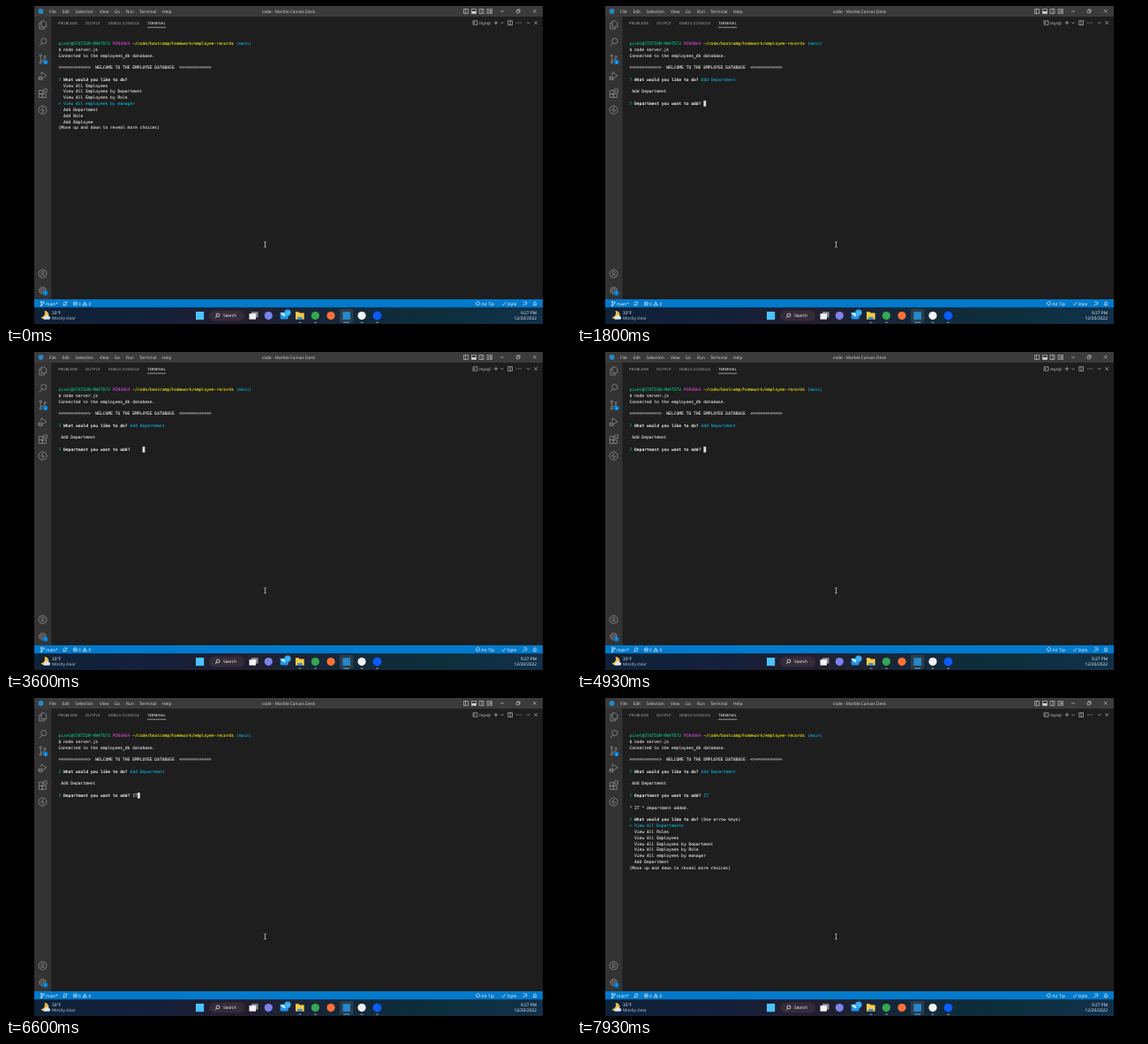
Animation, 640 px wide and 360 px high, one loop 8000 ms. Source, as an HTML page:

```html
<!DOCTYPE html>
<html lang="en">
<head>
<meta charset="utf-8">
<title>Employee records terminal</title>
<style>
  html, body { margin: 0; width: 100%; height: 100%; overflow: hidden; background: #000; }
  svg { display: block; width: 100vw; height: 100vh; }
  text { font-family: "Open Sans", sans-serif; font-size: 4.8px; fill: #d8d8d8; white-space: pre; text-rendering: geometricPrecision; }
  .term text { --ink: #dcdcdc; font-family: "DejaVu Sans Mono", monospace; font-size: 4.65px; fill: var(--ink); stroke: var(--ink); stroke-width: .1; }
  .term .bold { --ink: #f0f0f0; font-weight: 700; stroke: none; }
  .term .green { --ink: #0dbc79; }
  .term .magenta { --ink: #bc3fbc; }
  .term .yellow { --ink: #e5e510; }
  .term .cyan { --ink: #11a8cd; }
  .tabs text { font-size: 4.3px; fill: #aaa; }
  .tabs .on, .status text, .tray text { fill: #fff; }
  .line { fill: none; stroke: #8c8c8c; stroke-width: .8; }
  .chrome .line { stroke: #d0d0d0; stroke-width: .6; }
  .status .line { stroke: #fff; stroke-width: .6; }
  .tiny { font-size: 3.4px; fill: #fff; text-anchor: middle; }
  .end { text-anchor: end; }
</style>
</head>
<body>
<svg viewBox="0 0 640 360">
  <defs>
    <linearGradient id="taskbar">
      <stop offset="0" stop-color="#0e2238"/>
      <stop offset=".25" stop-color="#14203a"/>
      <stop offset=".4" stop-color="#241d2e"/>
      <stop offset=".6" stop-color="#14283a"/>
      <stop offset=".8" stop-color="#0c2f3c"/>
      <stop offset="1" stop-color="#12304a"/>
    </linearGradient>
  </defs>
  <rect width="640" height="360"/>
  <rect x="32" width="576" height="333" fill="#1e1e1e"/>
  <rect x="32" width="576" height="12" fill="#3b3b3b"/>
  <rect x="32" y="12" width="19.5" height="321" fill="#333"/>
  <rect x="32" y="341" width="576" height="19" fill="url(#taskbar)"/>
  <rect x="32" y="332" width="576" height="9.2" fill="#007acc"/>

  <g class="chrome">
    <circle cx="39.5" cy="6" r="2.9" fill="#2489ca"/>
    <g id="menu"></g>
    <text x="320" y="7.8" text-anchor="middle">code - Marble Canvas Desk</text>
    <path class="line" d="M518.5 3.5h5v5h-5zM520.5 3.5v5M527.5 3.5h5v5h-5zM536 3.5h5v5h-5zM539 3.5v5M545 3.5h2v5h-2zM548.5 3.5h2v2h-2zM548.5 6.5h2v2h-2z
      M560 6h4M578.2 4.8h3v3h-3zM579.2 4.8v-.9h2.9v2.9h-.9M597 4l3.6 3.6M600.6 4l-3.6 3.6"/>
    <path d="M527.5 6h5v2.5h-5z" fill="#d0d0d0"/>
    <path class="line" d="M529 16.8h5v4.4h-5zM530 18l1.2 1-1.2 1M552.7 19h4.6M555 16.7v4.6M560.5 18.3l1.5 1.5 1.5-1.5
      M568.7 16.7h4.8v4.8h-4.8zM571.1 16.7v4.8M590 18.2l1.7 1.7 1.7-1.7M598.4 17.2l3.6 3.6M602 17.2l-3.6 3.6"/>
    <path class="line" d="M578.4 19h5.5" stroke-dasharray=".8 1.4" style="stroke-width:.9"/>
    <text x="536" y="20.6" style="font-size:4.6px">mysql</text>
  </g>

  <g class="tabs">
    <text x="59" y="20.6">PROBLEMS</text>
    <text x="90" y="20.6">OUTPUT</text>
    <text x="116" y="20.6">DEBUG CONSOLE</text>
    <text x="160" y="20.6" class="on">TERMINAL</text>
    <path d="M160 24.2h21.3" stroke="#e7e7e7" stroke-width=".6"/>
  </g>

  <!-- activity bar -->
  <path class="line" d="M40 17h3.5l2.2 2.2v4.6H40zM40 19h-2.2v7h5.6v-2.2
    M41 41.8l-3.4 3.6M39.3 56.5v7M39.3 61.5q4.7 0 4.7-3
    M40 78v-3.2l6 4-4.5 3M37.3 80h3.6v3.5h-3.6zM36.5 81.8h5.2
    M37.3 95.5h4v4h-4zM37.3 99.5h4v4h-4zM41.3 99.5h4v4h-4zM42.7 94h3.6v3.6h-3.6z
    M42.4 114.2l-2.8 3.8h3.8l-2.8 3.2M38.3 306.4q3.2-4 6.4 0"/>
  <g class="line">
    <circle cx="42.8" cy="39.6" r="3.1"/>
    <circle cx="39.3" cy="56" r="1.2"/><circle cx="44" cy="57.5" r="1.2"/><circle cx="39.3" cy="64" r="1.2"/>
    <circle cx="41.5" cy="117.6" r="4.6"/>
    <circle cx="41.5" cy="303" r="4.6"/><circle cx="41.5" cy="301.8" r="1.6"/>
    <circle cx="41.5" cy="322" r="1.4"/><circle cx="41.5" cy="322" r="3.2"/>
    <circle cx="41.5" cy="322" r="4.2" stroke-dasharray="1.65"/>
  </g>
  <g fill="#007acc"><circle cx="44.7" cy="63.3" r="2.9"/><circle cx="44.7" cy="325" r="2.9"/></g>
  <text class="tiny" x="44.7" y="64.6">6</text>
  <text class="tiny" x="44.7" y="326.3">1</text>

  <g class="term" id="terminal"></g>
  <path d="M292.2 267h1l.3.4.3-.4h1M293.5 267.3v5.4M292.2 273h1l.3-.4.3.4h1" fill="none" stroke="#ddd" stroke-width=".7"/>

  <g class="status">
    <path class="line" d="M40 335.5v3.4M40 338q2.6 0 2.6-1.8M65 336.5a2.1 2.1 0 0 1 3.8-.6M68.9 337.3a2.1 2.1 0 0 1-3.8.6M68.9 334.7v1.5h-1.5M65 339.2v-1.5h1.5
      M77.4 335.9l2 2M79.4 335.9l-2 2M89.2 334.8l2.2 4.1h-4.4zM89.2 336.2v1.4
      M534.6 337v2.5M533.2 338.6a2.2 2.2 0 1 1 2.8 0M562 337.2l1.4 1.5 2.8-3.6
      M585.8 339.3l1.2-2M586 335h3.8v2.6h-2.2M597 338.2q.8-.7.8-2 0-1.4 1.2-1.4t1.2 1.4q0 1.3.8 2zM598.5 339.2h1"/>
    <g class="line"><circle cx="40" cy="335" r=".8"/><circle cx="42.6" cy="335.5" r=".8"/><circle cx="40" cy="339.3" r=".7"/><circle cx="78.4" cy="336.9" r="2.1"/></g>
    <text x="45" y="338.5">main*</text>
    <text x="82" y="338.5">0</text>
    <text x="93.5" y="338.5">0</text>
    <text x="538.6" y="338.5">Air Tip</text>
    <text x="567.5" y="338.5">Style</text>
  </g>

  <g class="tray">
    <path d="M43.5 345a4.8 4.8 0 1 1-3.8 7.4a5 5 0 0 0 3.8-7.4z" fill="#f5b942"/>
    <path d="M43.6 354.8a1.8 1.8 0 0 1 .6-3.4 2.2 2.2 0 0 1 4-.2 1.8 1.8 0 0 1 .4 3.6z" fill="#d8e6f4"/>
    <text x="52" y="349.2">33°F</text>
    <text x="52" y="355.2" style="fill:#c8ccd2">Mostly clear</text>
    <rect x="215" y="346" width="9.2" height="9.2" fill="#4cc2ff"/>
    <rect x="230" y="344.8" width="40" height="11.8" rx="5.9" fill="#352c3a"/>
    <circle cx="240" cy="350" r="1.9" fill="none" stroke="#fff" stroke-width=".7"/>
    <path d="M238.6 351.4l-1.7 1.8" stroke="#fff" stroke-width=".7"/>
    <text x="246" y="352.4">Search</text>
    <rect x="278" y="346.2" width="7.5" height="6.5" fill="#8a9098"/>
    <rect x="275.5" y="348.2" width="7.5" height="6.5" fill="#f2f2f2"/>
    <circle cx="297.3" cy="350.6" r="4.6" fill="#7b83eb"/>
    <rect x="310.7" y="346.8" width="9" height="7.8" rx="1" fill="#2196e8"/>
    <path d="M310.7 348l4.5 3.4 4.5-3.4v-.6h-9z" fill="#d6edff"/>
    <circle cx="319" cy="347.2" r="3.7" fill="#2aa9f2"/>
    <text class="tiny" x="319" y="348.5">17</text>
    <path d="M328 346.2h3.5l1.2 1.3h5v7.3H328z" fill="#f7c948"/>
    <path d="M330.2 352.2h5.3v2.6h-5.3z" fill="#2788d8"/>
    <circle cx="350.4" cy="350.6" r="4.6" fill="#34a853"/>
    <circle cx="368" cy="350.6" r="4.6" fill="#ff7139"/>
    <rect x="378" y="343" width="15.4" height="15.4" rx="1.5" fill="#2c3c4c"/>
    <rect x="381.4" y="346.3" width="8.6" height="8.6" fill="#2489ca"/>
    <circle cx="403" cy="350.6" r="4.6" fill="#f2f2f2"/>
    <circle cx="420.5" cy="350.6" r="4.9" fill="#0b5cff"/>
    <path d="M331.5 358.2h3M349 358.2h3M401.5 358.2h3M419 358.2h3" stroke="#9aa1aa" stroke-width=".9"/>
    <path d="M382.2 358.2h7" stroke="#4cc2ff" stroke-width=".9"/>
    <text class="end" x="601" y="349.2">9:27 PM</text>
    <text class="end" x="601" y="355.2">12/20/2022</text>
  </g>
</svg>
<script>
const LOOP = 8000, LEFT = 59.4, CELL = 2.8, TOP = 44, ROW = 6.81;
const choices = [
  'View All Departments', 'View All Roles', 'View All Employees',
  'View All Employees by Department', 'View All Employees by Role',
  'View All employees by manager', 'Add Department', 'Add Role',
  'Add Employee', 'Delete Department'
];
const menuTitles = { File: 49, Edit: 63.5, Selection: 78.5, View: 106, Go: 122.5, Run: 136, Terminal: 151, Help: 177 };
document.getElementById('menu').innerHTML = Object.entries(menuTitles)
  .map(([title, x]) => `<text x="${x}" y="7.8">${title}</text>`).join('');

const escapeText = s => s.replace(/&/g, '&amp;').replace(/</g, '&lt;');
const put = (row, col, text, style = '') =>
  `<text class="${style}" x="${LEFT + col * CELL}" y="${TOP + row * ROW}">${escapeText(text)}</text>`;
const question = (row, text) => put(row, 0, '?', 'green') + put(row, 2, text, 'bold');
const cursor = (row, col) =>
  `<rect x="${LEFT + col * CELL}" y="${TOP + row * ROW - 4.9}" width="${CELL}" height="6.5" fill="#ddd"/>`;

const header =
  put(0, 0, 'pixel@STATION-KW4TD72', 'green') + put(0, 22, 'MINGW64', 'magenta') +
  put(0, 30, '~/code/bootcamp/homework/employee-records', 'yellow') + put(0, 72, '(main)', 'cyan') +
  put(1, 0, '$ node server.js') +
  put(2, 0, 'Connected to the employees_db database.') +
  put(4, 0, '============>  WELCOME TO THE EMPLOYEE DATABASE  <============');

function menu(row, selected) {
  const first = Math.max(0, selected - 3);
  const items = choices.slice(first, first + 7).map((choice, i) => first + i === selected
    ? put(row + 1 + i, 0, '> ' + choice, 'cyan')
    : put(row + 1 + i, 2, choice));
  return question(row, 'What would you like to do?') + items.join('') +
    put(row + 8, 0, '(Move up and down to reveal more choices)');
}

const prompt = question(6, 'What would you like to do?') + put(6, 29, 'Add Department', 'cyan') +
  put(8, 1, 'Add Department') + question(10, 'Department you want to add?');
const typing = text => prompt + put(10, 30, text) + cursor(10, 30 + text.length);
const added = prompt + put(10, 30, 'IT', 'cyan') + put(12, 0, '" IT " department added.') +
  menu(14, 0) + put(14, 29, '(Use arrow keys)');

const scenes = [
  [0, menu(6, 5)],
  [400, menu(6, 6)],
  [1300, typing('')],
  [2700, typing('    ')],
  [4330, typing('')],
  [5800, typing('I')],
  [6060, typing('IT')],
  [7330, added]
];

const terminal = document.getElementById('terminal');
const began = performance.now();
let shown;
function draw() {
  const time = (performance.now() - began) % LOOP;
  const scene = scenes.findLast(([start]) => start <= time);
  if (scene !== shown) {
    terminal.innerHTML = header + scene[1];
    shown = scene;
  }
  requestAnimationFrame(draw);
}
draw();
</script>
</body>
</html>
```
